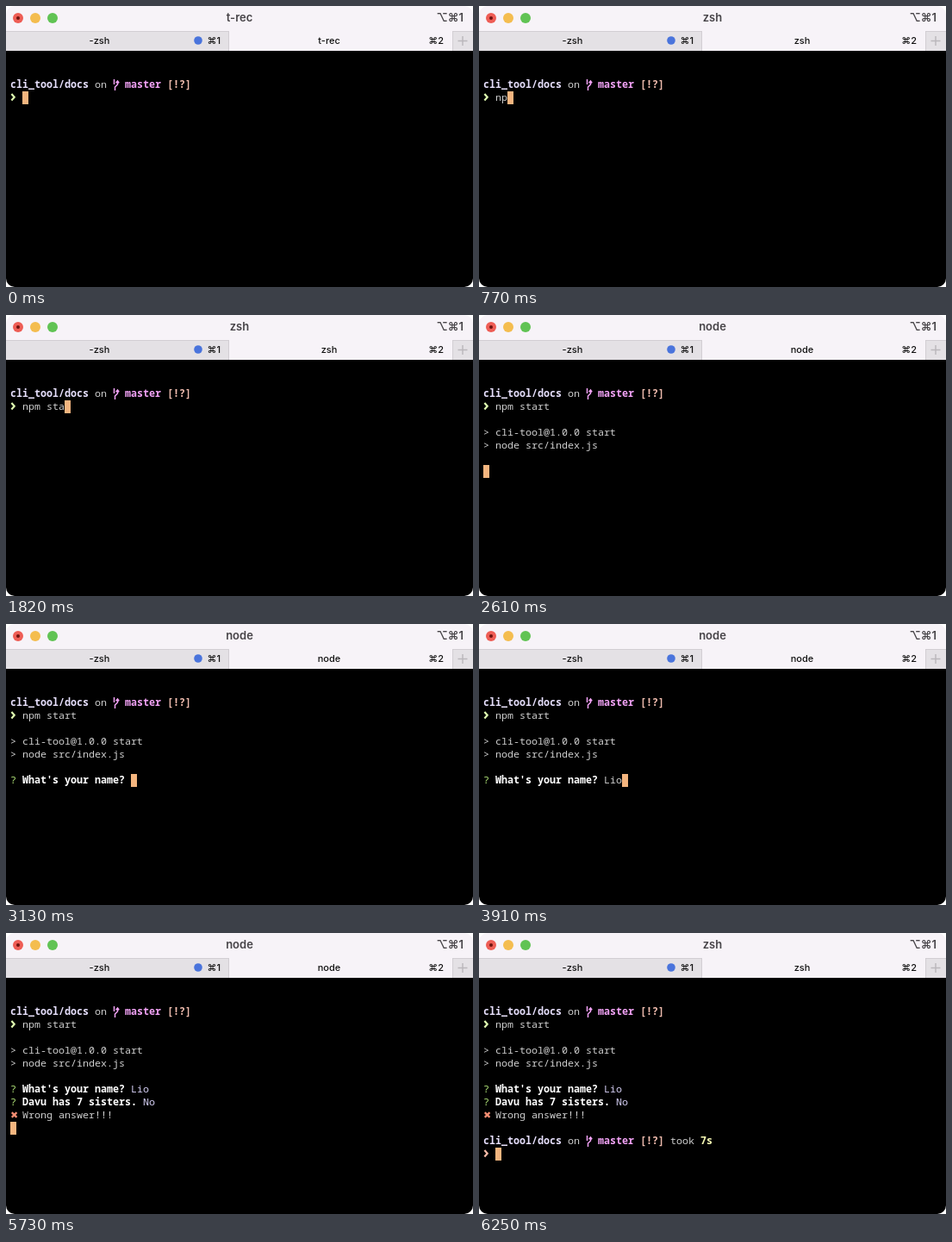
Animation of 542 by 326 pixels, one loop 9510 ms. Source, as an HTML page:

```html
<!DOCTYPE html>
<html lang="en">
<head>
<meta charset="utf-8">
<title>Terminal session</title>
<style>
  html, body { margin: 0; width: 100%; height: 100%; overflow: hidden; background: #fff; }
  svg { display: block; width: 542px; height: 326px; }
  .bar text { font: 500 11px Inter, "DejaVu Sans", sans-serif; fill: #111; }
  .bar .head { font-size: 13px; font-weight: 600; fill: #464347; }
  .mid { text-anchor: middle; }
  .end { text-anchor: end; }
  #screen text { font: 11.667px "Noto Sans Mono", "DejaVu Sans Mono", monospace; }
  #screen .b { font-weight: 600; }
  #screen .cross { font: 11px "DejaVu Sans", sans-serif; }
</style>
</head>
<body>
<svg viewBox="0 0 542 326">
  <clipPath id="win"><rect width="542" height="326" rx="10"/></clipPath>
  <g clip-path="url(#win)">
    <rect y="52" width="542" height="274"/>
    <g class="bar">
      <rect width="542" height="52" fill="#f7f3f8"/>
      <path d="M0 29H259V52H0ZM518 29H542V52H518Z" fill="#e4e1e5"/>
      <path d="M0 29.5H259M258.5 29V52M518.5 29V52M518 29.5H542" stroke="#d2ced3" fill="none"/>
      <circle cx="14" cy="14" r="6" fill="#ee5d55"/>
      <circle cx="14" cy="14" r="2" fill="#6d1410"/>
      <circle cx="34" cy="14" r="6" fill="#f4bd4f"/>
      <circle cx="54" cy="14" r="6" fill="#61c354"/>
      <circle cx="223" cy="40" r="4.8" fill="#4a74dc"/>
      <path d="M524.5 40.5H535.5M530 35V46" stroke="#bab7bb" stroke-width="1.4" fill="none"/>
      <text class="head mid job" x="271" y="18"></text>
      <text class="head end" x="531" y="17.5">⌥⌘1</text>
      <text class="mid" x="108.5" y="44">-zsh</text>
      <text class="end" x="249" y="44">⌘1</text>
      <text class="mid job" x="375" y="44"></text>
      <text class="end" x="508" y="44">⌘2</text>
    </g>
    <g id="screen"></g>
  </g>
</svg>
<script>
const LOOP = 9510, CELL = 7, LINE = 15, LEFT = 5, TOP = 84;
const C = {
  text: '#d0d0d0', dim: '#727272', white: '#ffffff', path: '#e6dffc', branch: '#f3a3f7',
  status: '#f0bcae', time: '#f6f8b4', ok: '#dcf6ae', fail: '#f5b9a6', cross: '#f58e73',
  ask: '#b4e87a', answer: '#d6d0f6', cursor: '#f4b57f'
};
const COMMAND = 'npm start', COMMAND_KEYS = [510, 770, 1030, 1290, 1290, 1560, 1820, 2090, 2350];
const NAME = 'Lio', NAME_KEYS = [3390, 3650, 3910];
// Lit dots of each spinner glyph, numbered down the left column, then the right
const SPIN = [[0, 1, 3], [2, 4, 5], [0, 3, 4]];

const screen = document.getElementById('screen');
const jobs = document.querySelectorAll('.job');

const px = col => LEFT + col * CELL;
const py = row => TOP + row * LINE;
const text = (row, col, str, fill, cls = '') =>
  `<text x="${px(col)}" y="${py(row) + 11}" fill="${fill}" class="${cls}">${str}</text>`;
const cursor = (row, col) =>
  `<rect x="${px(col)}" y="${py(row)}" width="${CELL}" height="${LINE}" fill="${C.cursor}"/>`;
const typed = (str, keys, t) => str.slice(0, keys.filter(k => t >= k).length);
const line = (x, y, d, color, width) =>
  `<path transform="translate(${x} ${y})" d="${d}" stroke="${color}" stroke-width="${width}" fill="none"/>`;

function prompt(row, arrow) {
  return text(row, 0, 'cli_tool/docs', C.path, 'b') + text(row, 14, 'on', C.text) +
    line(px(17), py(row), 'M1.5 1V7M2.5 14V10L5.5 7V3M3.6 5.2L5.5 3L7.2 5.2', C.branch, 1.5) +
    text(row, 19, 'master', C.branch, 'b') + text(row, 26, '[!?]', C.status, 'b') +
    line(px(0), py(row + 1), 'M1.4 3L4.7 6.7L1.4 10.4', arrow, 2.2);
}

const question = (row, str) => text(row, 0, '?', C.ask) + text(row, 2, str, C.white, 'b');

const spinner = (row, dots) => dots.map(d =>
  `<circle cx="${d < 3 ? 8.2 : 11}" cy="${py(row) + 4.2 + d % 3 * 3}" r="1" fill="${C.ask}"/>`).join('');

function draw(t) {
  const command = typed(COMMAND, COMMAND_KEYS, t);
  let out = prompt(0, C.ok) + text(1, 2, command, C.text);
  let at = [1, 2 + command.length];

  if (t >= 2350) at = [2, 0];
  if (t >= 2610) {
    out += text(3, 0, '> cli-tool@1.0.0 start', C.text) + text(4, 0, '> node src/index.js', C.text);
    at = [6, 0];
  }
  if (t >= 2870) {
    const name = typed(NAME, NAME_KEYS, t);
    out += question(6, "What's your name?") + text(6, 20, name, t < 4170 ? C.text : C.answer);
    at = [6, 20 + name.length];
  }
  if (t >= 4170) {
    out += question(7, 'Davu has 7 sisters.');
    if (t < 4950) {
      const reply = typed('n', [4690], t);
      out += text(7, 22, '(Y/n)', C.dim) + text(7, 28, reply, C.text);
      at = [7, 28 + reply.length];
    } else {
      out += text(7, 22, 'No', C.answer);
    }
  }
  if (t >= 4950 && t < 5730) {
    out += spinner(8, SPIN[Math.floor((t - 4950) / 260)]) + text(8, 2, 'Checking...', C.text);
    at = null;
  }
  if (t >= 5730) {
    out += text(8, 0, '✖', C.cross, 'cross') + text(8, 2, 'Wrong answer!!!', C.text);
    at = [9, 0];
  }
  if (t >= 5990) {
    out += prompt(10, C.fail) + text(10, 31, 'took', C.text) + text(10, 36, '7s', C.time, 'b');
    at = [11, 2];
  }
  return at ? out + cursor(...at) : out;
}

const jobAt = t => t < 250 ? 't-rec' : t >= 2610 && t < 6250 ? 'node' : 'zsh';

let shown;
function tick() {
  const t = performance.now() % LOOP;
  const job = jobAt(t), view = draw(t);
  if (job + view !== shown) {
    shown = job + view;
    jobs.forEach(el => el.textContent = job);
    screen.innerHTML = view;
  }
  requestAnimationFrame(tick);
}
tick();
</script>
</body>
</html>
```
